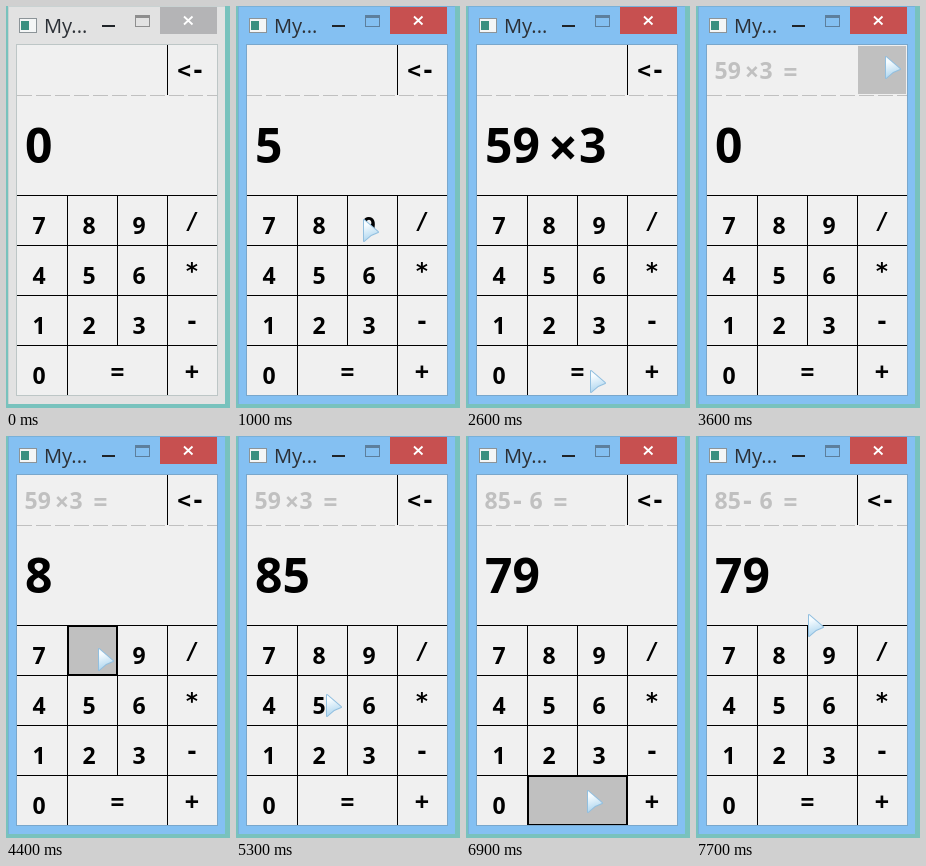
An HTML page with a canvas that plays this animation: 224x402 px, repeating every 8 s.

```html
<!DOCTYPE html>
<html lang="en">
<head>
<meta charset="utf-8">
<title>Calculator</title>
<style>
html, body { margin: 0; width: 100%; height: 100%; overflow: hidden; background: #78c2bd; }
canvas { display: block; }
</style>
</head>
<body>
<canvas id="stage" width="224" height="402"></canvas>
<script>
const ctx = document.getElementById('stage').getContext('2d');
const LOOP = 8000, STEP = 100, CELL = 50;
const DIGITS = '"Noto Sans", "Open Sans", sans-serif';
const SIGNS = '"DejaVu Sans Mono", monospace';
const FACE = '#f0f0f0', GRAY = '#c0c0c0';

const isDigit = id => /\d/.test(id);

const keys = [{ id: '<-', x: 161, y: 39, w: CELL, h: CELL }];
['789/', '456*', '123-', '0= +'].forEach((line, row) => {
  [...line].forEach((id, col) => {
    if (id === ' ') return;
    const w = id === '=' ? 2 * CELL - 1 : CELL - 1;
    keys.push({ id, x: 12 + col * CELL, y: 190 + row * CELL, w, h: CELL - 1 });
  });
});

// Where the pointer clicks, and when; the last stop is a plain move.
const stops = [
  { at: 500, key: '5', x: 88, y: 240 },
  { at: 1100, key: '9', x: 127, y: 213 },
  { at: 1600, key: '*', x: 185, y: 262 },
  { at: 2100, key: '3', x: 134, y: 328 },
  { at: 2700, key: '=', x: 124, y: 364 },
  { at: 3600, key: '<-', x: 189, y: 50 },
  { at: 4400, key: '8', x: 92, y: 212 },
  { at: 5100, key: '5', x: 90, y: 258 },
  { at: 5800, key: '-', x: 185, y: 320 },
  { at: 6400, key: '6', x: 138, y: 276 },
  { at: 6900, key: '=', x: 121, y: 354 },
  { at: 7800, key: '', x: 112, y: 178 }
];

function press(calc, key) {
  const { a, op, b } = calc;
  const type = n => n === '0' ? key : n + key;
  if (isDigit(key)) return op ? { ...calc, b: type(b) } : { ...calc, a: type(a) };
  if (key === '<-') return { ...calc, a: '0', op: '', b: '' };
  if (key === '=') {
    const value = op === '-' ? a - b : a * b;
    return { a: String(value), op: '', b: '', past: calc };
  }
  return key ? { ...calc, op: key === '*' ? '×' : key, b: '0' } : calc;
}

function stateAt(t) {
  let calc = { a: '0', op: '', b: '', past: null }, held = '';
  for (const { at, key } of stops) {
    if (t < at) break;
    calc = press(calc, key);
    held = t < at + (isDigit(key) ? 200 : 100) ? key : '';
  }
  return { calc, held };
}

function pointerAt(t) {
  let from = { at: -200, x: 120, y: -26 };
  for (const to of stops) {
    const start = from.at + 200, end = to.at - 100;
    if (t < end) {
      const k = Math.max(0, (t - start) / (end - start));
      const e = k * k * (3 - 2 * k);
      return [from.x + (to.x - from.x) * e, from.y + (to.y - from.y) * e];
    }
    from = to;
  }
  return [from.x, from.y];
}

function rect(color, x, y, w, h) {
  ctx.fillStyle = color;
  ctx.fillRect(x, y, w, h);
}

function text(str, x, y, size, align = 'center', color = '#000') {
  ctx.font = `700 ${size}px ${isDigit(str) ? DIGITS : SIGNS}`;
  ctx.textAlign = align;
  ctx.fillStyle = color;
  ctx.fillText(str, x, y);
}

function drawWindow(active) {
  rect('#78c2bd', 0, 0, 224, 402);
  rect(active ? '#78b0d8' : '#c9d2d2', 2, 0, 217, 398);
  rect(active ? '#84c0f2' : '#e2e2e2', 3, 1, 216, 397);

  // app icon
  rect('#8c9498', 13, 12, 18, 15);
  rect('#f4f6f6', 14, 13, 16, 13);
  rect('#3a9080', 15, 15, 8, 9);

  ctx.font = '20px "Open Sans", "Noto Sans", sans-serif';
  ctx.textAlign = 'left';
  ctx.fillStyle = '#2c3036';
  ctx.fillText('My...', 38, 27);

  rect('#202428', 96, 19, 13, 2);
  const gray = active ? '#5d7f9d' : '#8e8e8e';
  ctx.strokeStyle = gray;
  ctx.lineWidth = 1;
  ctx.strokeRect(129.5, 9.5, 14, 11);
  rect(gray, 129, 9, 15, 3);

  rect(active ? '#c75050' : '#b4b4b6', 154, 1, 57, 27);
  ctx.strokeStyle = '#fff';
  ctx.lineWidth = 1.8;
  ctx.beginPath();
  ctx.moveTo(178, 10.5); ctx.lineTo(186.5, 18.5);
  ctx.moveTo(186.5, 10.5); ctx.lineTo(178, 18.5);
  ctx.stroke();

  rect(active ? '#79a7cc' : '#bdc6c6', 10, 38, 202, 352);
  rect(FACE, 11, 39, 200, 350);
}

function drawGrid() {
  for (let x = 11; x < 211; x += 19) rect(GRAY, x, 89, Math.min(15, 211 - x), 1);
  for (let y = 189; y < 340; y += CELL) rect('#000', 11, y, 200, 1);
  for (let x = 61; x < 162; x += CELL) rect('#000', x, 189, 1, x === 111 ? 150 : 200);
  rect('#000', 161, 39, 1, CELL);
}

function drawKey({ id, x, y, w, h }, down) {
  if (down) {
    rect(id === '<-' ? FACE : '#000', x, y, w, h);
    rect(GRAY, x + 1, y + 1, w - 2, h - 2);
  } else if (isDigit(id)) {
    text(id, x + 21, y + 38, 23);
  } else {
    text(id, x + (id === '=' ? w / 2 : 24), y + 33, 23);
  }
}

function drawExpression({ a, op, b }, y, size, color) {
  const unit = size / 48;
  text(a, 18 + unit, y, size, 'left', color);
  if (!op) return;
  text(op, 18 + (op === '×' ? 79 : 70) * unit, y, size, 'center', color);
  text(b, 18 + 95 * unit, y, size, 'left', color);
}

function drawPointer(x, y) {
  ctx.save();
  ctx.translate(Math.round(x), Math.round(y));
  const fill = ctx.createLinearGradient(3, 6, 8, 22);
  fill.addColorStop(0, '#f6fcff');
  fill.addColorStop(1, '#a9d3ee');
  ctx.beginPath();
  ctx.moveTo(1, 1);
  ctx.lineTo(15, 13);
  ctx.lineTo(8, 16);
  ctx.lineTo(1, 22);
  ctx.closePath();
  ctx.lineJoin = 'round';
  ctx.lineWidth = 2;
  ctx.strokeStyle = '#92bfdf';
  ctx.fillStyle = fill;
  ctx.stroke();
  ctx.fill();
  ctx.restore();
}

function draw(t) {
  const { calc, held } = stateAt(t);
  drawWindow(t >= stops[0].at);
  drawGrid();
  if (calc.past) {
    drawExpression(calc.past, 73, 23, GRAY);
    text('=', 94.5, 73, 23, 'center', GRAY);
  }
  drawExpression(calc, 157, 48, '#000');
  for (const key of keys) drawKey(key, key.id === held);
  drawPointer(...pointerAt(t));
}

function tick() {
  const t = performance.now() % LOOP;
  draw(Math.floor(t / STEP) * STEP);
  requestAnimationFrame(tick);
}
tick();
</script>
</body>
</html>
```
